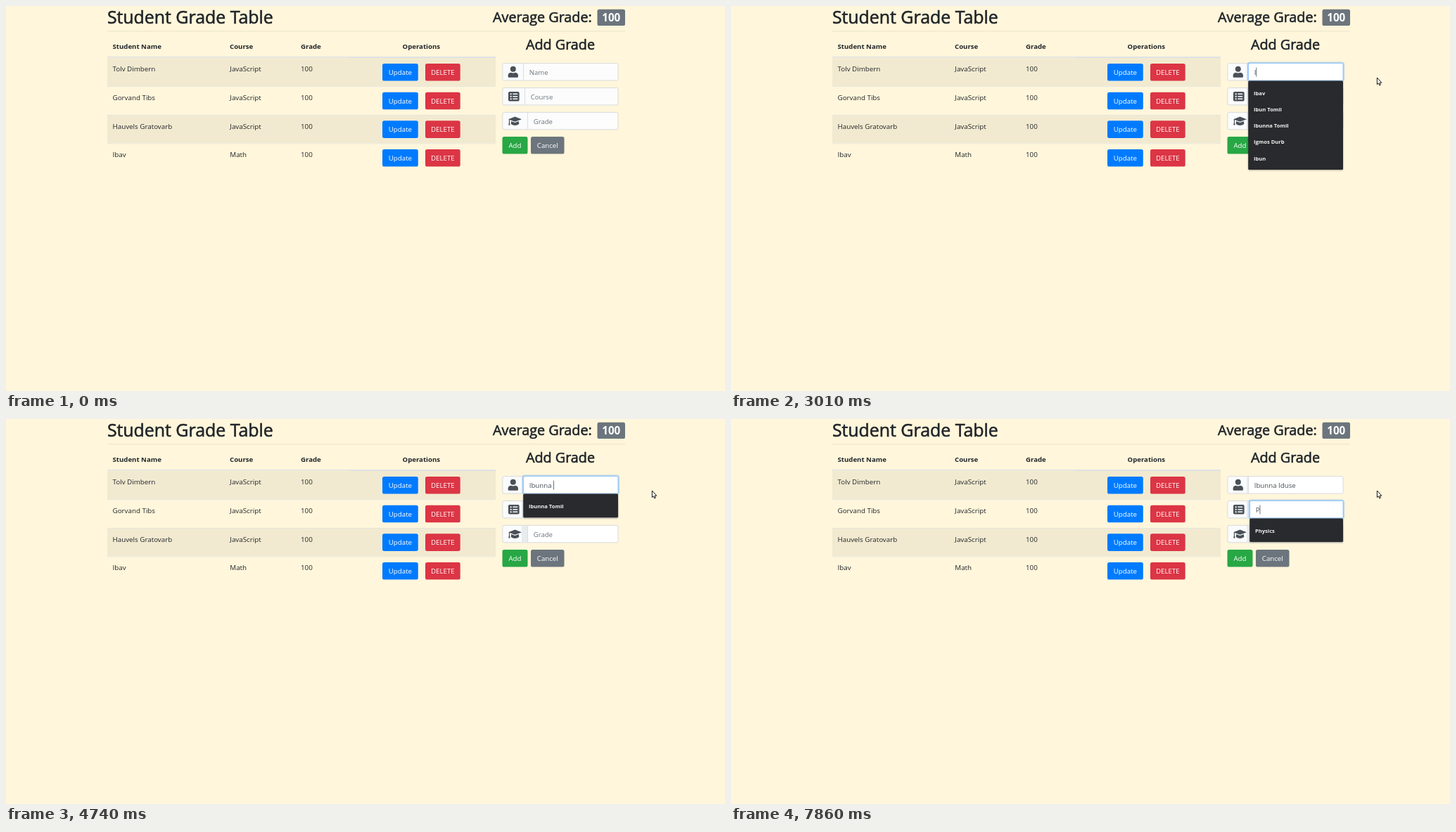
An HTML page that plays this animation: 1022x548 px, repeating every 8000 ms.

```html
<!DOCTYPE html>
<html lang="en">
<head>
<meta charset="utf-8">
<title>Student Grade Table</title>
<style>
  html, body { margin: 0; width: 100%; height: 100%; overflow: hidden; background: #fff6db; }
  svg { display: block; width: 100vw; height: 100vh; }
  text { font: 9.8px "Open Sans", "Noto Sans", sans-serif; fill: #212529; white-space: pre; }
  .mid { text-anchor: middle; }
  .head { stroke: #212529; stroke-width: .6px; }
  .h1 { font-size: 24.9px; }
  .h2 { font-size: 19.8px; }
  .th { font-size: 9.65px; font-weight: 700; }
  .btn { font-size: 9.7px; fill: #fff; }
  .badge { font-size: 15.2px; font-weight: 700; fill: #fff; }
  .value { font-size: 9.7px; fill: #495057; }
  .hint { font-size: 9.6px; fill: #6c757d; }
  .option { font-size: 7.6px; font-weight: 700; fill: #f1f1f1; }
  .icon { fill: #495057; }
  .menu { filter: drop-shadow(0 1px 1px rgba(0, 0, 0, .3)); }
</style>
</head>
<body>
<svg id="stage" viewBox="0 0 1022 548" xmlns="http://www.w3.org/2000/svg"></svg>
<script>
const LOOP = 8000;
const ROW = 40.67;
const stage = document.getElementById('stage');

function add(parent, tag, attrs = {}, content) {
  const el = document.createElementNS('http://www.w3.org/2000/svg', tag);
  for (const key in attrs) el.setAttribute(key, attrs[key]);
  if (content !== undefined) el.textContent = content;
  parent.append(el);
  return el;
}
const rect = (parent, x, y, width, height, fill, rx = 0, more = {}) =>
  add(parent, 'rect', { x, y, width, height, fill, rx, ...more });
const label = (parent, x, y, content, cls = '') =>
  add(parent, 'text', { x, y, class: cls }, content);
const show = (el, on) => el.setAttribute('visibility', on ? 'visible' : 'hidden');

function button(x, y, width, fill, content) {
  rect(stage, x, y, width, 24.6, fill, 2.6);
  label(stage, x + width / 2, y + 16, content, 'btn mid');
}

// Heading
label(stage, 143.9, 25.2, 'Student Grade Table', 'head h1');
label(stage, 692, 22.6, 'Average Grade:', 'head h2');
rect(stage, 840.5, 4.7, 39.5, 23.3, '#6c757d', 2.6);
label(stage, 860.3, 22.3, '100', 'badge mid');
rect(stage, 144, 35.5, 736, .8, 'rgba(0,0,0,.1)');

// Table
[[151.5, 'Student Name'], [318, 'Course'], [419, 'Grade']]
  .forEach(([x, name]) => label(stage, x, 61, name, 'th'));
label(stage, 590.3, 61, 'Operations', 'th mid');

[['Tolv Dimbern', 'JavaScript'], ['Gorvand Tibs', 'JavaScript'],
 ['Hauvels Gratovarb', 'JavaScript'], ['Ibav', 'Math']].forEach(([name, course], i) => {
  const y = 73.6 + i * ROW;
  if (i % 2 === 0) rect(stage, 144, y, 552, ROW, 'rgba(0,0,0,.05)');
  if (i) rect(stage, 144, y, 552, .65, '#dee2e6');
  label(stage, 151.5, y + 19.8, name);
  label(stage, 318.3, y + 19.8, course);
  label(stage, 419, y + 19.8, '100');
  button(535, y + 8.4, 50.8, '#007bff', 'Update');
  button(596, y + 8.4, 49.7, '#dc3545', 'DELETE');
});
rect(stage, 144, 72, 344, 1.4, '#dee2e6');
rect(stage, 488, 72, 208, 2, '#dee2e6');

// Form
label(stage, 788, 62, 'Add Grade', 'head h2 mid');
button(705.5, 186, 36, '#28a745', 'Add');
button(746, 186, 47.5, '#6c757d', 'Cancel');

const border = { stroke: '#ced4da', 'stroke-width': .8 };

function field(y, split, hint) {
  const g = add(stage, 'g');
  rect(g, 705.8, y, split - 705.8 + 3, 24.4, '#fafbfc', 2.6, border);
  const strip = rect(g, 733, y + .4, split - 733, 23.6, '#e9ecef');
  const ring = rect(g, split - 1, y - 1, 872 - split, 26.4, 'none', 3,
    { stroke: '#007bff', 'stroke-width': 2 });
  const box = rect(g, split, y, 870 - split, 24.4, '#fcfcfc', 1.6, border);
  const x = split + 8.1;
  const value = label(g, x, y + 16.6, hint, 'hint');
  const caret = rect(g, x, y + 6, .8, 13, '#495057');
  const menu = add(g, 'g', { class: 'menu' });

  function setMenu(names) {
    menu.replaceChildren();
    if (!names.length) return;
    rect(menu, split - .4, y + 25, 870.4 - split, names.length * 23.24 + 10.3, '#292a2d', 1.5);
    names.forEach((name, i) => label(menu, split + 7.4, y + 45 + i * 23.24, name, 'option'));
  }

  return {
    g,
    update({ text, focus, blink, names, touched }) {
      value.textContent = text || hint;
      value.setAttribute('class', text ? 'value' : 'hint');
      box.setAttribute('stroke', focus > .5 ? '#80bdff' : focus ? '#a9cbee' : '#ced4da');
      box.setAttribute('fill', touched ? '#fff' : '#fcfcfc');
      ring.setAttribute('stroke-opacity', .27 * focus);
      show(strip, touched);
      caret.setAttribute('x', x + (text ? value.getComputedTextLength() : 0));
      show(caret, focus && blink);
      setMenu(names);
    }
  };
}

// Built from the bottom up, so that an open menu covers the fields below it.
const grade = field(151.4, 741.6, 'Grade');
const course = field(116.5, 737.6, 'Course');
const person = field(81.6, 735.6, 'Name');

// Field icons
add(grade.g, 'path', { class: 'icon', d:
  'M723.5 157.6 L733 161.2 L723.5 164.8 L716 162 V166 L716.6 169.5 H714.2 L714.9 166 V161.6 L714 161.2Z' +
  'M718.2 163.9 L723.5 165.9 L728.8 163.9 L729.3 168 Q723.5 171.8 717.7 168Z' });
rect(course.g, 714, 122, 15.6, 13.6, '#495057', 1.8);
[125.3, 128.8, 132.3].forEach(y => {
  add(course.g, 'circle', { cx: 717.7, cy: y, r: 1.15, fill: '#fafbfc' });
  rect(course.g, 720.3, y - .7, 7, 1.4, '#fafbfc', .4);
});
add(person.g, 'circle', { class: 'icon', cx: 720.8, cy: 89.8, r: 4 });
add(person.g, 'path', { class: 'icon', d:
  'M717.7 94.7 Q720.8 96.3 723.9 94.7 Q728 95 728 99.2 V100.2 Q728 101.8 726.4 101.8 H715.2 Q713.6 101.8 713.6 100.2 V99.2 Q713.6 95 717.7 94.7Z' });

// Pointer shapes, with the hot spot at 0,0
const arrow = add(stage, 'path', { d: 'M.4 0 V9.6 L2.4 7.8 L3.8 11 L5.3 10.3 L4 7.2 H6.8Z',
  fill: '#fff', stroke: '#000', 'stroke-width': .9, 'stroke-linejoin': 'round' });
const beam = add(stage, 'path', { d: 'M-2 -5 H-.5 L0 -4.5 L.5 -5 H2 M0 -4.5 V4.5 M-2 5 H-.5 L0 4.5 L.5 5 H2',
  fill: 'none', stroke: '#222', 'stroke-width': .9 });

const recent = ['Ibav', 't482_kTelb', 'Trovels Chimdan', 'Wudi', 'Gluft', 'faef'];
const known = ['Ibav', 'Ibun Tomil', 'Ibunna Tomil', 'Igmos Durb', 'Ibun'];
const matching = prefix => known.filter(name => name.startsWith(prefix));
const typed = (name, menu = name) => ({ name, names: matching(menu), blink: true });

// Each step lists only what changes at that time.
const steps = [
  [0, { name: '', subject: '', names: [], subjects: [], nameFocus: 0, subjectFocus: 0, blink: true, touched: false, at: null }],
  [550, { at: [1002, 60] }],
  [640, { at: [966, 67] }],
  [730, { at: [912, 79] }],
  [810, { at: [842, 92] }],
  [900, { at: [788, 96] }],
  [980, { at: [822, 94] }],
  [1070, { at: [849, 93] }],
  [2010, { nameFocus: .3, names: recent, touched: true }],
  [2100, { nameFocus: .75, at: [862, 94] }],
  [2190, { nameFocus: 1, at: [902, 100] }],
  [2270, { at: [918, 102] }],
  [2460, { blink: false }],
  [3010, typed('I')],
  [3190, typed('Ib', 'I')],
  [3280, typed('Ib')],
  [3370, typed('Ibu')],
  [3460, typed('Ibun')],
  [4010, { blink: false }],
  [4190, typed('Ibunn', 'Ibun')],
  [4280, typed('Ibunn')],
  [4650, typed('Ibunna')],
  [4740, typed('Ibunna ')],
  [5290, { blink: false }],
  [5850, { blink: true }],
  [6310, typed('Ibunna I')],
  [6580, typed('Ibunna Id')],
  [6670, typed('Ibunna Idu')],
  [6850, typed('Ibunna Idus')],
  [6940, typed('Ibunna Iduse')],
  [7310, { nameFocus: .3, subjectFocus: .6 }],
  [7400, { nameFocus: 0, subjectFocus: 1 }],
  [7780, { subject: 'P' }],
  [7860, { subjects: ['Physics'] }]
];
let carry = {};
const states = steps.map(([time, change]) => ({ time, ...(carry = { ...carry, ...change }) }));

function draw(s) {
  const { blink, touched, at } = s;
  grade.update({ text: '', focus: 0, blink, names: [], touched });
  course.update({ text: s.subject, focus: s.subjectFocus, blink, names: s.subjects, touched });
  person.update({ text: s.name, focus: s.nameFocus, blink: blink && !s.subjectFocus, names: s.names, touched });

  const overInput = at && at[0] < 870 && at[1] > 81;
  show(arrow, at && !overInput);
  show(beam, overInput);
  if (at) [arrow, beam].forEach(el => el.setAttribute('transform', `translate(${at})`));
}

let current;
function tick() {
  const time = performance.now() % LOOP;
  const next = states.findLast(s => s.time <= time);
  if (next !== current) draw(current = next);
  requestAnimationFrame(tick);
}
tick();
</script>
</body>
</html>
```
